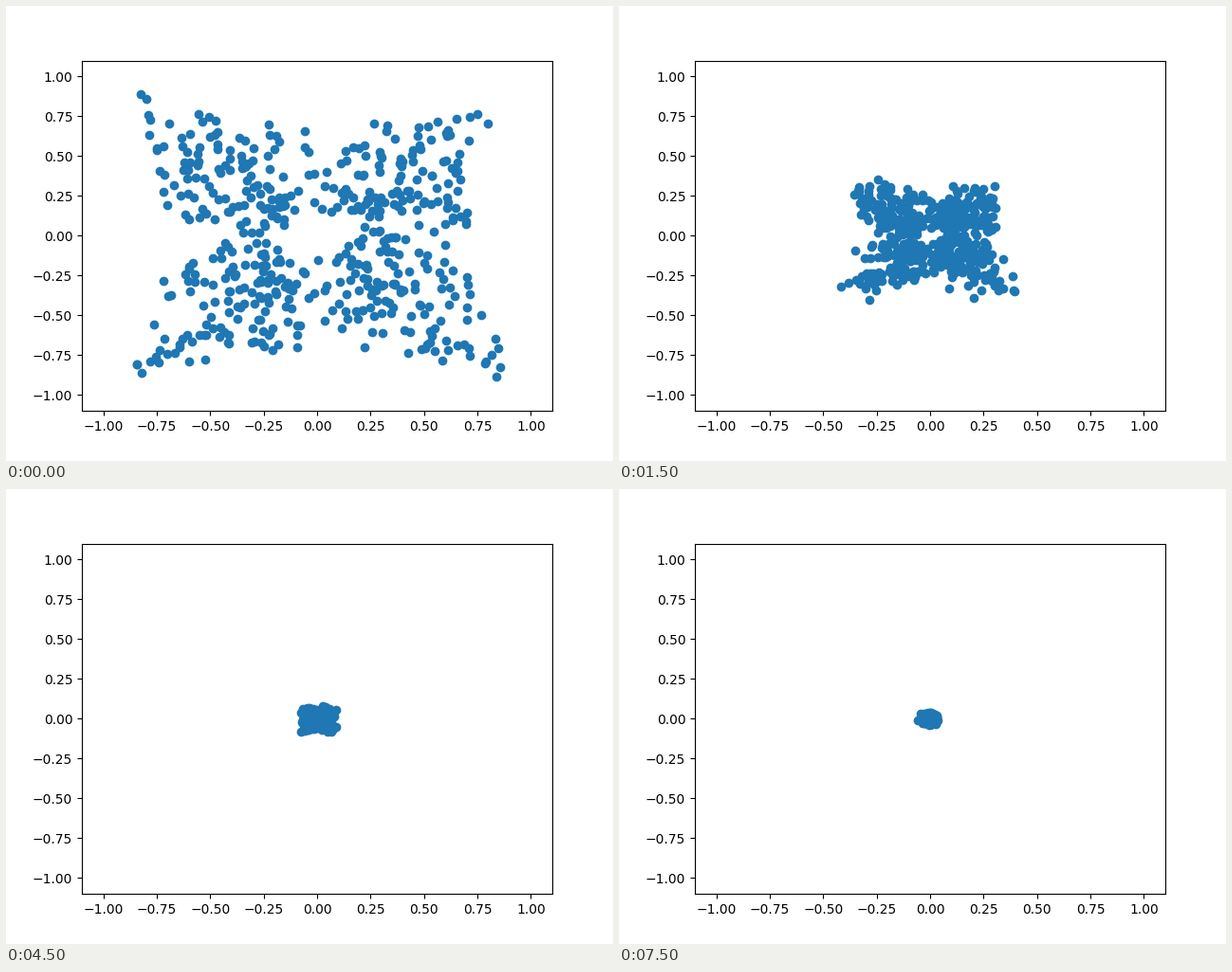
A matplotlib script that plays this animation: 640x480 px, repeating every 8 s.

```python
import numpy as np
import matplotlib.pyplot as plt
from matplotlib.animation import FuncAnimation

STEPS = 16
COUNT = 500
HOLE = .13
rng = np.random.default_rng(11)


def signed_beta(a, b, n):
    return rng.choice([-1, 1], n) * rng.beta(a, b, n)


def start_cloud(n):
    """Pincushion cloud: long corners, pulled-in sides, empty middle."""
    u = signed_beta(1.5, 1.65, 2 * n)
    v = signed_beta(1.35, 1.5, 2 * n)
    pts = np.column_stack([u * (.73 + .25 * v**2), v * (.71 + .28 * u**2)])
    return pts[np.hypot(*pts.T) > HOLE][:n]


def shrink(pts):
    """Pull every coordinate towards zero by a random share, with jitter."""
    pull = rng.uniform(.66, .82, pts.shape)
    return pts * pull + rng.normal(0, .009, pts.shape)


path = [start_cloud(COUNT)]
while len(path) < STEPS:
    path.append(shrink(path[-1]))

fig, ax = plt.subplots(figsize=(6.4, 4.8), dpi=100)
ax.set_xlim(-1.1, 1.1)
ax.set_ylim(-1.1, 1.1)
dots = ax.scatter(*path[0].T, color="tab:blue")


def update(i):
    dots.set_offsets(path[i])
    return dots,


anim = FuncAnimation(fig, update, frames=STEPS, interval=500,
                     repeat=True, repeat_delay=0)
plt.show()
```
